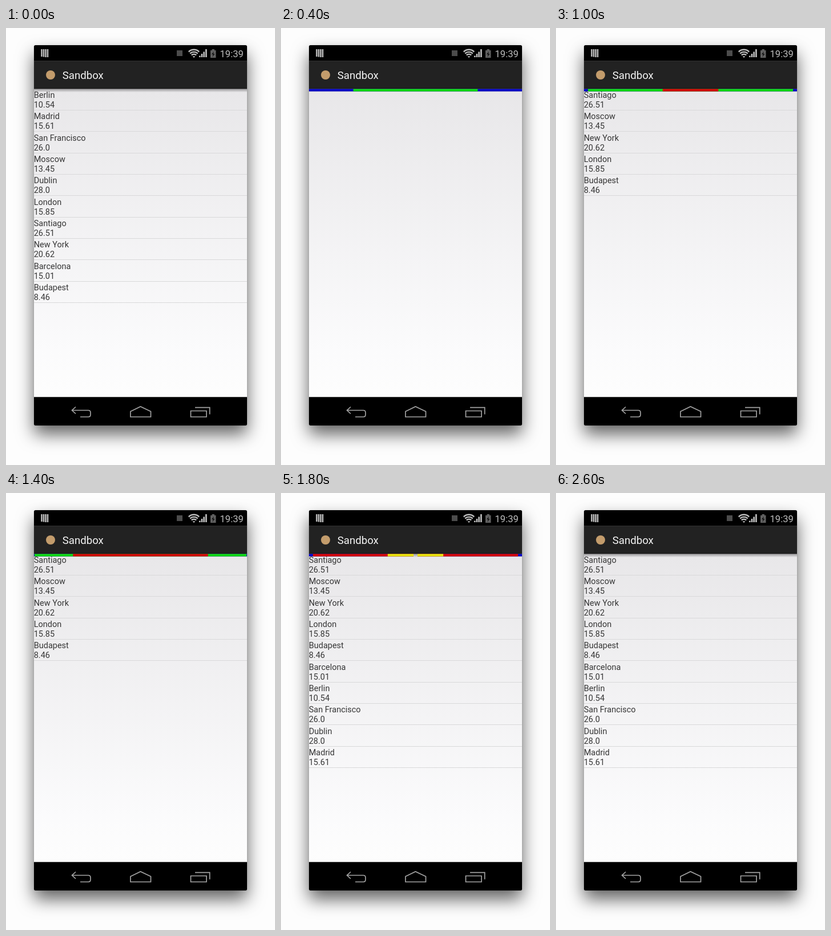
An HTML page with a canvas that plays this animation: 471 by 763 pixels, repeating every 2800 ms.

```html
<!DOCTYPE html>
<html lang="en">
<head>
<meta charset="utf-8">
<title>Refreshing list</title>
<style>
  html, body { margin: 0; width: 100%; height: 100%; overflow: hidden; background: #fdfdfd; }
  #phone {
    position: absolute; left: 49px; top: 30px; width: 373px; height: 664px;
    border-radius: 3px; background: #000;
    box-shadow: 0 15px 30px rgba(0, 0, 0, .62), 0 0 1px rgba(0, 0, 0, .5);
  }
  svg { position: absolute; left: 0; top: 0; }
  #bar { position: absolute; left: 49px; top: 106px; }
  text { font-family: Roboto, sans-serif; }
  #list text { font-size: 14.5px; fill: #363636; }
</style>
</head>
<body>
<div id="phone"></div>
<svg width="471" height="763" viewBox="0 0 471 763">
  <defs>
    <linearGradient id="page" x1="0" y1="0" x2="0" y2="1">
      <stop offset="0" stop-color="#e8e7e9"/>
      <stop offset=".85" stop-color="#fbfbfc"/>
      <stop offset="1" stop-color="#fdfdfd"/>
    </linearGradient>
    <linearGradient id="edge" x1="0" y1="0" x2="0" y2="1">
      <stop offset="0" stop-opacity=".35"/>
      <stop offset="1" stop-opacity="0"/>
    </linearGradient>
  </defs>

  <!-- Status bar -->
  <path d="M62.5 37v13M66 37v13.5M69.5 37v14M73 37v14" stroke="#bdbdbd" stroke-width="2.5"/>
  <rect x="299" y="39" width="10" height="10" fill="#4c4c4c"/>
  <g fill="none" stroke="#bdbdbd" stroke-width="2.4">
    <path d="M319.8 41.6a13 13 0 0 1 18.4 0M322.3 44.6a9.5 9.5 0 0 1 13.4 0M324.8 47.4a6 6 0 0 1 8.4 0"/>
    <path d="M339.3 51v-2.5M343 51v-6M346.7 51v-9.5M350.4 51v-14" stroke-width="2.7"/>
  </g>
  <path d="M326.5 49.2h5L329 52z" fill="#bdbdbd"/>
  <path d="M358 39h2.5v-2h4.500v2h2.500v13h-9.500z" fill="#606060"/>
  <path d="M364 41l-4 5h2.500l-1 4.500 4-5.500h-2.500z" fill="#111"/>
  <text x="374.500" y="50.500" font-size="16.600" fill="#bdbdbd">19:39</text>

  <!-- Action bar -->
  <rect x="49" y="57" width="373" height="49.300" fill="#222"/>
  <path d="M49 57.500h373" stroke="#303030"/>
  <path d="M49 105.500h373" stroke="#161616"/>
  <circle cx="78" cy="82" r="8" fill="#c39c6c"/>
  <text x="98.700" y="89" font-size="18.650" fill="#f3f3f3">Sandbox</text>

  <!-- Content -->
  <rect x="49" y="106.300" width="373" height="538" fill="url(#page)"/>
  <rect x="49" y="106.300" width="373" height="6" fill="url(#edge)"/>
  <g id="list"></g>

  <!-- Navigation bar -->
  <g fill="none" stroke="#a3a3a3" stroke-width="1.700">
    <path d="M122 661.500l-6.500 6 6.500 6M115.500 667.500H144q4 0 4 4V675q0 4-4 4H130"/>
    <path d="M218 679V669.500l17.500-8.500 18 8.500V679z"/>
    <path d="M323.500 668.500h27.500v10.500h-27.500zM331 662.700h25.700V674.500"/>
  </g>
</svg>
<canvas id="bar" width="373" height="5"></canvas>

<script>
const LOOP = 2800, CYCLE = 2000, FINISH_START = 1170, FINISH_LENGTH = 1000;
const ROW = 37.33, TOP = 106.3;
const BLUE = '#0000c4', GREEN = '#0fda0f', RED = '#d60000', YELLOW = '#e8e80a';

const temperatures = {
  'Berlin': '10.54', 'Madrid': '15.61', 'San Francisco': '26.0', 'Moscow': '13.45',
  'Dublin': '28.0', 'London': '15.85', 'Santiago': '26.51', 'New York': '20.62',
  'Barcelona': '15.01', 'Budapest': '8.46'
};
const before = Object.keys(temperatures);
const after = ['Santiago', 'Moscow', 'New York', 'London', 'Budapest',
  'Barcelona', 'Berlin', 'San Francisco', 'Dublin', 'Madrid'];

// [loop time, refresh time]; each pose holds until the next one.
const poses = [[200, 215], [400, 386], [800, 573], [1000, 760], [1400, 910], [1600, 1085],
  [1800, 1260], [2000, 1410], [2200, 1560], [2400, 1720]];

const list = document.getElementById('list');
const bar = document.getElementById('bar');
const ctx = bar.getContext('2d');

// cubic-bezier(.4, 0, .2, 1)
function ease(x) {
  if (x <= 0) return 0;
  if (x >= 1) return 1;
  let low = 0, high = 1, u;
  for (let i = 0; i < 24; i++) {
    u = (low + high) / 2;
    const at = 1.2 * (1 - u) ** 2 * u + .6 * (1 - u) * u * u + u ** 3;
    if (at < x) low = u; else high = u;
  }
  return 3 * (1 - u) * u * u + u ** 3;
}

function drawBar(elapsed) {
  const center = bar.width / 2;
  const spread = (color, start) => {
    const half = center * ease((elapsed - start) / (CYCLE / 2));
    ctx.fillStyle = color;
    ctx.fillRect(center - half, .4, 2 * half, 4.2);
  };
  ctx.clearRect(0, 0, bar.width, bar.height);
  if (elapsed === null) return;
  spread(BLUE, -CYCLE / 2);
  // A colour gives way to the blue base once the next-but-one has begun.
  if (elapsed <= CYCLE * .5) spread(GREEN, 0);
  if (elapsed >= CYCLE * .25 && elapsed <= CYCLE * .75) spread(RED, CYCLE * .25);
  if (elapsed >= CYCLE * .5) spread(YELLOW, CYCLE * .5);
  const gap = center * ease((elapsed - FINISH_START) / FINISH_LENGTH);
  ctx.clearRect(center - gap, 0, 2 * gap, bar.height);
}

let shownKey = '';
function showRows(names) {
  const key = names.join();
  if (key === shownKey) return;
  shownKey = key;
  list.innerHTML = names.map((name, i) => {
    const y = TOP + i * ROW;
    return `<text x="48.7" y="${y + 15.7}">${name}</text>
      <text x="48.7" y="${y + 32.7}">${temperatures[name]}</text>
      <rect x="49" y="${Math.round(y + 36.8)}" width="373" height="1" fill="#d9d9da"/>`;
  }).join('');
}

function render(time) {
  const t = time % LOOP;
  const pose = poses.filter(([start]) => start <= t).pop();
  const finished = t >= 2600;
  const elapsed = pose && !finished ? pose[1] : null;
  drawBar(elapsed);
  if (!pose) showRows(before);
  else if (finished || elapsed >= FINISH_START) showRows(after);
  else showRows(after.slice(0, elapsed < 500 ? 0 : 5));
}

const origin = performance.now();
function tick() {
  render(performance.now() - origin);
  requestAnimationFrame(tick);
}
tick();
</script>
</body>
</html>
```
